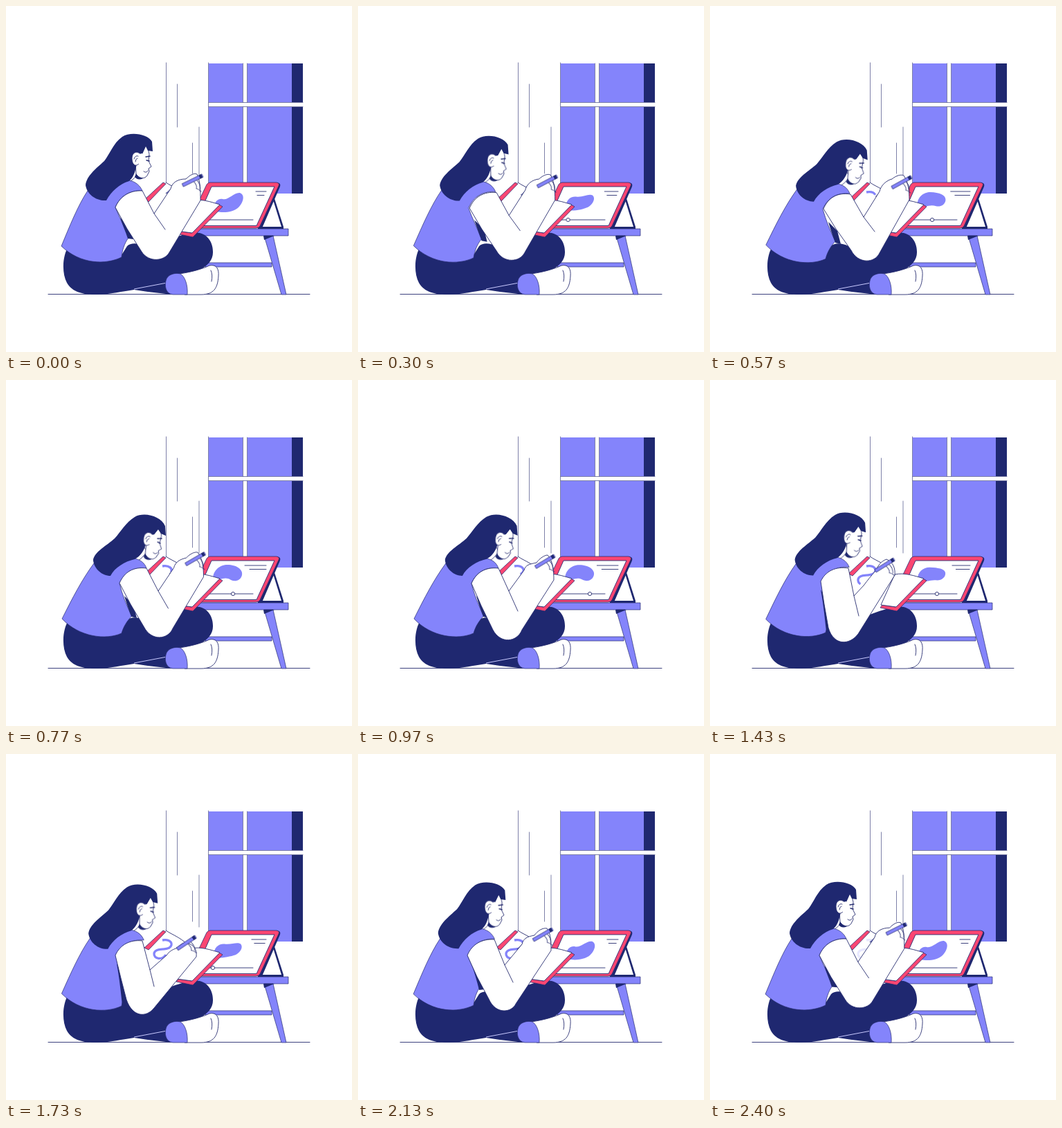
Recreate the animation shown at these times as an HTML page without scripts. Size 500x500 px, loop 2.43 s.

```html
<!DOCTYPE html>
<html lang="en">
<head>
<meta charset="utf-8">
<title>Woman sketching</title>
<style>
  html, body { margin: 0; width: 100%; height: 100%; overflow: hidden; background: #fff; }
  svg { display: block; width: 100%; height: 100%; }
  .line { fill: none; stroke: #272d70; stroke-width: .9; stroke-linecap: round; stroke-linejoin: round; }
  .thin { stroke-width: .6; }
  .bold { stroke-width: 1.5; }
  .white { fill: #fff; stroke: #272d70; stroke-width: .9; stroke-linejoin: round; }
  .violet { fill: #8484fb; }
  .navy { fill: #1f2870; }
  .red { fill: #fb4672; stroke: #272d70; stroke-width: .8; stroke-linejoin: round; }
  .edge { stroke: #272d70; stroke-width: .7; }

  /* Slow lean forward and back */
  .lean { animation: 2430ms ease-in-out infinite; }
  .face { animation-name: face; transform-origin: 195px 225px; }
  .hair { animation-name: hair; }
  .shirt { animation-name: shirt; }
  .neck { animation-name: neck; }
  .blob { animation-name: blob; }
  .bar1 { animation-name: bar1; }
  .bar2 { animation-name: bar2; }
  @keyframes face { 33% { transform: translate(16px, 10px) rotate(9deg); } }
  @keyframes neck { 33% { transform: translate(11px, 8px); } }
  @keyframes bar1 { 0%, 100% { d: path("M361 268H376"); } 33% { d: path("M345 268H376"); } }
  @keyframes bar2 { 0%, 100% { d: path("M363 273.5H373"); } 33% { d: path("M352 273.5H376"); } }
  @keyframes hair {
    0%, 100% { d: path("M212 210L211 196C205 185 180 181 168 189C155 198 150 214 142 224C130 235 116 246 115 259C117 272 130 282 145 281C152 268 164 257 178 253C185 247 187 238 189 228L197 214L202 203L205 209Z"); }
    33% { d: path("M231 225L230 211C224 197 200 190 186 198C173 206 166 219 157 229C146 239 128 248 126 260C127 273 139 283 151 283C157 271 172 262 186 259C195 254 199 247 202 238L212 226L220 216L224 222Z"); }
  }
  @keyframes shirt {
    0%, 100% { d: path("M80 347C92 318 104 288 118 267L150 262L178 252C188 254 194 260 197 267C180 266 165 274 158 291C164 306 172 320 177 335C171 343 168 353 167 363C145 374 108 374 80 347Z"); }
    33% { d: path("M81 345C96 315 110 288 127 265L158 262L186 258C196 260 201 266 203 272C184 270 171 278 164 294C168 310 174 326 182 341C175 348 170 356 167 366C145 376 106 372 81 345Z"); }
  }
  @keyframes blob {
    0%, 100% { d: path("M301 294C300 283 306 278 313 279C322 281 329 269 338 270C346 273 343 284 336 291C328 299 312 299 305 297Z"); }
    33% { d: path("M299 288C299 274 310 267 320 267C333 267 343 274 341 282C339 290 331 292 325 289C316 283 308 290 303 290Z"); }
  }

  /* Drawing hand and what follows it */
  .draw { animation: 2430ms linear infinite; }
  .arm { animation-name: arm; }
  .crease { animation-name: crease; }
  .side { animation-name: side; }
  .pen { animation-name: pen; }
  .nib { animation-name: pen, nib; }
  .knob { animation-name: knob; }
  .ink { animation-name: ink; fill: none; stroke: #8484fb; stroke-width: 3.3; stroke-dasharray: 1 2; }
  @keyframes arm {
    0%, 100% { d: path("M197 267L214 300L238 264c2-9 10-14 22-14c6-6 12-9 16-7c5 10 5 24 5 38L236 356C229 369 206 371 196 355L175 322L158 291C165 274 180 266 197 267Z"); }
    23.46% { d: path("M203 272L222 305L245 268c2-9 10-16 18-18c6-5 13-7 17-5c7 10 8 24 8 35L245 357C238 372 214 373 204 353L182 322L164 293C171 277 184 269 203 272Z"); }
    39.92% { d: path("M203 272L218 305L240 275c2-8 8-9 18-11c5-7 12-11 16-11c8 8 9 24 9 36L237 361C230 379 206 382 195 361L178 326L164 294C171 278 184 270 203 272Z"); }
    58.85% { d: path("M200 272L208 312L222 297c6-8 10-13 17-21c4-8 8-14 16-17c10 4 13 14 12 23L214 367C202 383 179 385 171 358L165 324L160 291C167 276 182 269 200 272Z"); }
    71.19% { d: path("M197 270L208 312L232 291c4-6 8-8 16-11c4-5 8-7 12-7c12 2 16 10 15 20L214 367C203 381 183 381 174 355L166 324L158 291C165 275 180 268 197 270Z"); }
    87.65% { d: path("M197 268L212 305L237 275c2-9 8-11 18-13c5-7 12-11 18-10c6 8 6 20 6 32L228 361C222 374 199 377 189 354L172 322L158 291C165 274 180 267 197 268Z"); }
  }
  @keyframes crease {
    0%, 100% { d: path("M214 300L230 323"); }
    23.46% { d: path("M222 305L238 326"); }
    39.92% { d: path("M218 305L231 334"); }
    58.85% { d: path("M208 312L215 341"); }
    71.19% { d: path("M208 312L214 336"); }
    87.65% { d: path("M212 305L224 330"); }
  }
  @keyframes side {
    0%, 100% { d: path("M165 306L180 320L184 337L176 336C173 326 168 316 165 306Z"); }
    23.46%, 39.92% { d: path("M171 312L184 325L189 344L181 342C177 332 174 322 171 312Z"); }
    58.85%, 71.19% { d: path("M160 303L180 340L185 366L168 363C166 345 164 325 160 303Z"); }
    87.65% { d: path("M165 306L178 320L184 340L175 341C172 328 168 316 165 306Z"); }
  }
  @keyframes pen {
    0%, 100% { transform: translate(284px, 245px) rotate(-26deg); }
    23.46% { transform: translate(291px, 247px) rotate(-29deg); }
    39.92% { transform: translate(284px, 254px) rotate(-31deg); }
    58.85% { transform: translate(266px, 259px) rotate(-32deg); }
    71.19% { transform: translate(274px, 264px) rotate(-34deg); }
    87.65% { transform: translate(281px, 253px) rotate(-30deg); }
  }
  @keyframes nib {
    0%, 40%, 88%, 100% { opacity: 1; }
    50%, 75% { opacity: 0; }
  }
  @keyframes knob {
    0%, 80%, 100% { transform: translateX(0); }
    23.46% { transform: translateX(37px); }
    39.92% { transform: translateX(51px); }
    58.85% { transform: translateX(44px); }
    71.19% { transform: translateX(15px); }
  }
  @keyframes ink {
    0%, 16% { stroke-dashoffset: 1; opacity: 1; }
    23.46% { stroke-dashoffset: .8; }
    39.92% { stroke-dashoffset: .66; }
    58.85% { stroke-dashoffset: .22; }
    71.19% { stroke-dashoffset: 0; }
    88% { stroke-dashoffset: 0; opacity: 1; }
    100% { stroke-dashoffset: 0; opacity: .1; }
  }
</style>
</head>
<body>
<svg viewBox="0 0 500 500">
  <g id="window">
    <path class="violet" d="M293 83H342V139H293ZM349 83H413V139H349ZM293 146H342V271H293ZM349 146H413V271H349Z"/>
    <path class="navy" d="M413 83H429V139H413ZM413 146H429V271H413Z"/>
    <path class="line thin" d="M293 139.500H429M293 145.500H429M342.500 83V139M348.500 83V139M342.500 146V271M348.500 146V271"/>
  </g>
  <path class="line thin" d="M231.500 82V255M292.500 82V271M247.500 113V175M279 175V250M269.500 198V242"/>
  <path class="line" d="M61 416.500H439"/>

  <g id="table">
    <path class="violet edge" d="M288 371H384V377H288ZM373 332H386L405 417H398ZM268 322H408V332H268Z"/>
    <path class="navy" d="M372 332H388L373 338Z"/>
  </g>

  <g id="tablet">
    <path class="navy" d="M390 255Q398 255 396 261L370 321H363ZM385 277L387 275L401 319V322H364V319H398Z"/>
    <path class="red" d="M295 255H391Q396 256 394 260L367 318Q365 321 361 321H272L270 300L290 258Q292 255 295 255Z"/>
    <path class="white" d="M297 261H388L362 317.500H272Z"/>
    <path class="violet lean blob" d="M301 294C300 283 306 278 313 279C322 281 329 269 338 270C346 273 343 284 336 291C328 299 312 299 305 297Z"/>
    <path class="line lean bar1" d="M361 268H376"/>
    <path class="line lean bar2" d="M363 273.5H373"/>
    <path class="line" d="M284 309H357"/>
    <circle class="white draw knob" cx="284" cy="309" r="2.6"/>
  </g>

  <g id="legs">
    <path class="navy" d="M90 348C82 360 80 385 88 400C96 414 112 417 130 417C150 417 170 412 185 410L205 413L240 417L236 396C270 388 300 378 299 355C299 338 287 325 270 328C240 332 225 345 200 347C190 342 180 342 175 347L165 363Z"/>
    <path d="M185 409L243 398" fill="none" stroke="#c9caff" stroke-width="1"/>
    <path class="white" d="M250 387C266 385 284 380 294 375C304 373 308 380 307 390C306 408 300 417 282 417H258Z"/>
    <path class="violet edge" d="M232 394C228 404 231 416 241 417H262C263 404 259 391 252 387C244 385 235 388 232 394Z"/>
    <path class="line" d="M296 382Q299 388 297 398"/>
  </g>

  <g id="sketchbook">
    <path fill="#fff" d="M231 256L206 283L214 305L250 327L270 280Z"/>
    <path class="red" d="M227 255L231 257L206 283L200 280ZM313 290L270 334L246 329L249 325L268 328L306 286Z"/>
    <path class="white" d="M267 281C281 278 296 283 309 287L269 328L247 325Z"/>
    <path class="line" d="M231 255C241 262 256 266 267 281"/>
    <path class="draw ink" pathLength="1" d="M226 269C238 267 243 275 236 280C228 284 216 280 214 288C213 297 226 298 231 290"/>
  </g>

  <g id="woman">
    <path class="white lean neck" d="M181 222L193 240C187 247 184 251 178 254L168 259Z"/>
    <path class="violet edge lean shirt" d="M80 347C92 318 104 288 118 267L150 262L178 252C188 254 194 260 197 267C180 266 165 274 158 291C164 306 172 320 177 335C171 343 168 353 167 363C145 374 108 374 80 347Z"/>
    <path class="navy draw side" d="M165 306L180 320L184 337L176 336C173 326 168 316 165 306Z"/>
    <g class="lean face">
      <path class="white" d="M186 206L203 198L207 214L206 224L210 232L206 235L207 239L204 245C200 251 192 249 188 243Z"/>
      <path class="navy" d="M188 242Q191 248 198 249Q191 253 186 247Z"/>
    </g>
    <path class="navy lean hair" d="M212 210L211 196C205 185 180 181 168 189C155 198 150 214 142 224C130 235 116 246 115 259C117 272 130 282 145 281C152 268 164 257 178 253C185 247 187 238 189 228L197 214L202 203L205 209Z"/>
    <g class="lean face">
      <path class="white" d="M194 214C190 209 182 211 182 220C182 229 187 233 192 228Z"/>
      <path fill="#fff" d="M192 214L197 213V229L191 228Z"/>
      <path class="line" d="M185 221Q187 215 191 217M187 225Q187 221 190 220M199 239Q203 242 205 238"/>
      <path class="line bold" d="M202 218L208 217M203 223L207 224"/>
    </g>
    <path class="violet edge draw nib" d="M-30-2.300H-50L-59 0L-50 2.300H-30Z"/>
    <path class="white draw arm" d="M197 267L214 300L238 264c2-9 10-14 22-14c6-6 12-9 16-7c5 10 5 24 5 38L236 356C229 369 206 371 196 355L175 322L158 291C165 274 180 266 197 267Z"/>
    <path class="line draw crease" d="M214 300L230 323"/>
    <g class="draw pen">
      <path class="violet edge" d="M-32-2.300H0V2.300H-32Z"/>
      <path class="navy" d="M-5-2.600H-1V2.600H-5Z"/>
      <path class="line" d="M-15 3Q-13 9-16 13M-10 3Q-8 10-12 16M-16 13Q-13 16-12 20"/>
    </g>
  </g>
</svg>
</body>
</html>
```
